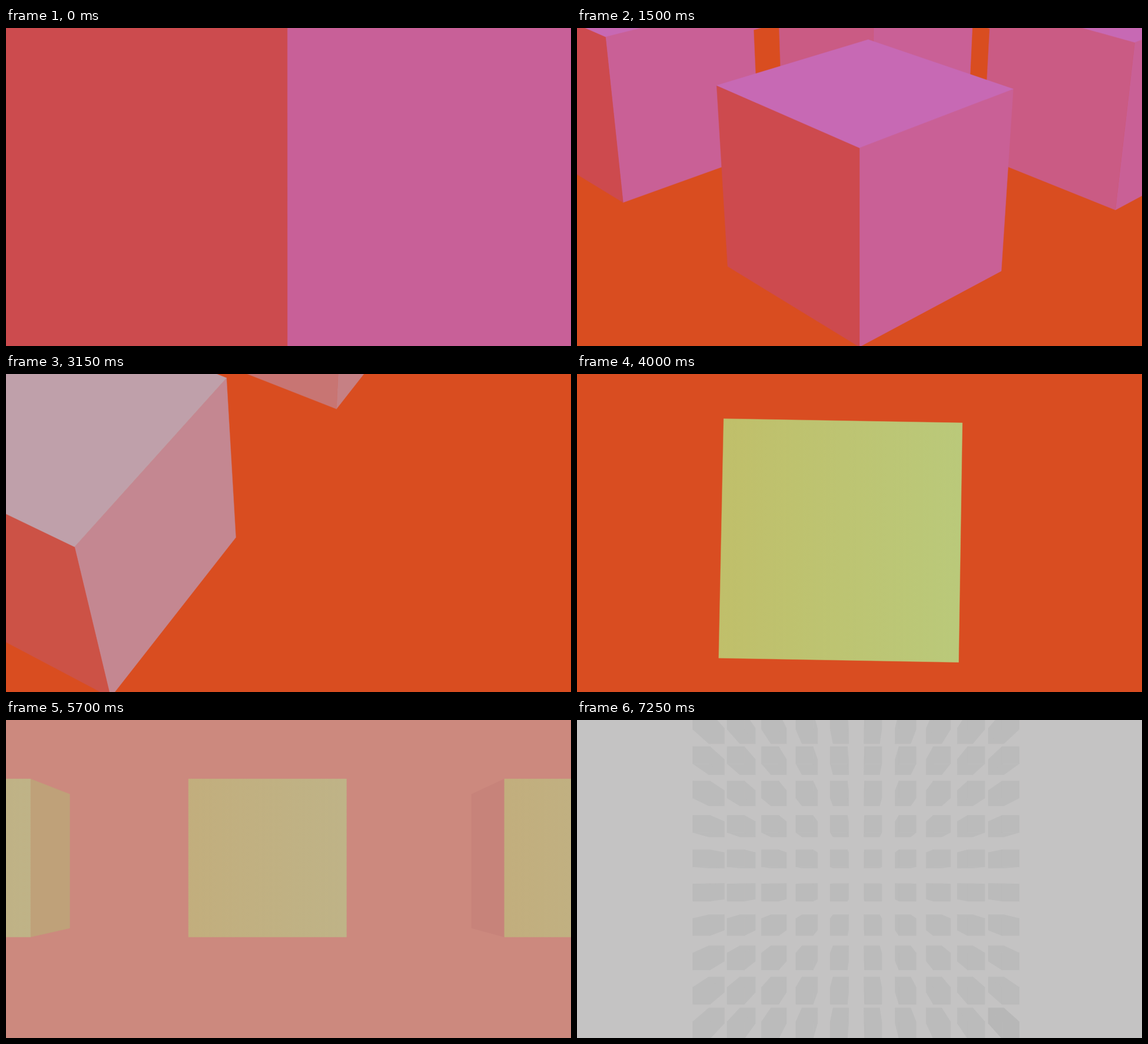
Animation of 960x540 px, one loop 8350 ms. Source, as an HTML page with a canvas:

```html
<!DOCTYPE html>
<html lang="en">
<head>
<meta charset="utf-8">
<title>Cube field</title>
<style>
  html, body { margin: 0; height: 100%; overflow: hidden; background: #d94d20; }
  canvas { display: block; width: 100vw; height: 100vh; }
</style>
</head>
<body>
<canvas id="stage" width="960" height="540"></canvas>
<script>
const ctx = document.getElementById('stage').getContext('2d');
const LOOP = 8350, STEP = 50, GRID = 10, PITCH = 2;

// Camera poses: x, y, z, heading and tilt in degrees, focal length in px.
// Unit cubes lie with their tops at z = 0; the corner cube stands at the origin.
const poses = [
  [1.91, -1.91, -0.2, 44.94, 8, 2000],
  [3.679, -3.469, 2.017, 47.02, 27.3, 1862],
  [0, 0, 4.55, 0, 90, 1827],
  [-8.8, 8.8, 9.4, 0, 90, 273.5]
];
// Start, end and easing power of each camera move.
const moves = [[200, 1850, 2.5], [2250, 4290, 2.5], [4933, 7288, 2]];

// Colours along the journey, which runs from 0 to 3.
const stops = [0, 1, 1.365, 2, 2.036, 2.212, 2.5, 3];
const track = list => list.split(' ').map(hex => [0, 2, 4].map(i => parseInt(hex.substr(i, 2), 16)));
const tracks = {
  ground: track('d94d20 d94d20 d94d20 d94d21 d75b41 cc897e c5b2b0 c4c3c3'),
  top: track('c769b4 c769b4 bfa0aa bdc570 bcc870 bbc384 bbbfac b7b7b7'),
  right: track('c86098 c96096 c48791 b8cd69 b8cd69 b9ac77 bab5a6 b7b7b7'),
  front: track('cc4b4e cd4a4e cc5246 cc5246 cc5246 c58078 bdb0ad b7b7b7')
};

const clamp = v => Math.min(1, Math.max(0, v));
const mix = (a, b, k) => a.map((v, i) => v + (b[i] - v) * k);
const css = c => `rgb(${c.map(Math.round)})`;
const ease = (t, p) => t < 0.5 ? (2 * t) ** p / 2 : 1 - (2 - 2 * t) ** p / 2;

function face(axis, sign, name) {
  const corners = [[-1, -1], [1, -1], [1, 1], [-1, 1]].map(([p, q]) => {
    const v = [];
    v[axis] = sign / 2;
    v[(axis + 1) % 3] = p / 2;
    v[(axis + 2) % 3] = q / 2;
    return v;
  });
  return { axis, sign, name, corners };
}
const faces = [
  face(0, 1, 'right'), face(0, -1, 'front'),
  face(1, 1, 'front'), face(1, -1, 'front'), face(2, 1, 'top')
];

const cubes = [];
for (let i = 0; i < GRID; i++)
  for (let j = 0; j < GRID; j++) cubes.push([-PITCH * i, PITCH * j, -0.5]);

function colorAt(name, journey) {
  let i = 0;
  while (i < stops.length - 2 && journey > stops[i + 1]) i++;
  const list = tracks[name];
  return mix(list[i], list[i + 1], (journey - stops[i]) / (stops[i + 1] - stops[i]));
}

function projector([x, y, z, heading, tilt, focal]) {
  const a = heading * Math.PI / 180, b = tilt * Math.PI / 180;
  const ca = Math.cos(a), sa = Math.sin(a), cb = Math.cos(b), sb = Math.sin(b);
  return p => {
    const dx = p[0] - x, dy = p[1] - y, dz = p[2] - z;
    const side = dx * ca + dy * sa, ahead = dy * ca - dx * sa;
    const scale = focal / (ahead * cb - dz * sb);
    return [480 + side * scale, 270 - (ahead * sb + dz * cb) * scale];
  };
}

function fillFace(points, paint) {
  ctx.beginPath();
  points.forEach(p => ctx.lineTo(p[0], p[1]));
  ctx.closePath();
  ctx.fillStyle = ctx.strokeStyle = paint;
  ctx.fill();
  ctx.stroke();
}

function draw(time) {
  const progress = moves.map(([from, to, power]) => ease(clamp((time - from) / (to - from)), power));
  const journey = progress.reduce((a, b) => a + b);
  const camera = progress.reduce((pose, k, i) => mix(pose, poses[i + 1], k), poses[0]);
  const project = projector(camera);
  const colors = {};
  for (const name in tracks) colors[name] = colorAt(name, journey);

  ctx.fillStyle = css(colors.ground);
  ctx.fillRect(0, 0, 960, 540);
  ctx.lineWidth = 0.5;
  ctx.lineJoin = 'round';

  const haze = 0.32 * clamp(journey - 1);
  const sheen = Math.max(0, 1 - 2 * Math.abs(journey - 2));
  const distance = c => Math.hypot(...c.map((v, i) => v - camera[i]));
  const ordered = cubes.map(c => [distance(c), c]).sort((a, b) => b[0] - a[0]);

  for (const [, center] of ordered) {
    const isCorner = !center[0] && !center[1];
    for (const { axis, sign, name, corners } of faces) {
      if ((camera[axis] - center[axis]) * sign <= 0.5) continue;
      const points = corners.map(v => project(v.map((d, i) => d + center[i])));
      let color = colors[name];
      // Front faces deeper in the grid catch light from their neighbours.
      if (axis === 1 && sign < 0 && center[1] > 0) color = mix(color, colors.right, 0.75);
      if (!isCorner) color = mix(color, colors.ground, haze);
      let paint = css(color);
      if (name === 'top' && sheen > 0) {
        const shift = k => css(color.map((v, i) => v + [-3, 5, 8][i] * k * sheen));
        paint = ctx.createLinearGradient(...points[0], ...points[1]);
        paint.addColorStop(0, shift(-1));
        paint.addColorStop(1, shift(1));
      }
      fillFace(points, paint);
    }
  }
}

const start = performance.now();
function tick() {
  const time = (performance.now() - start) % LOOP;
  draw(Math.floor(time / STEP) * STEP);
  requestAnimationFrame(tick);
}
tick();
</script>
</body>
</html>
```
